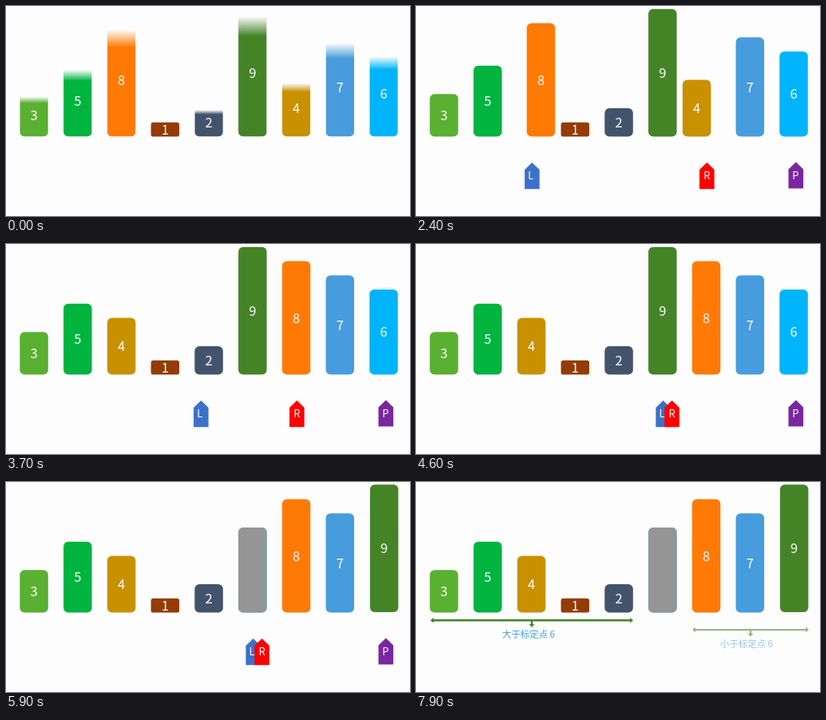
These frames come from a looping animation (506x263 px, 8000 ms). An HTML page:

```html
<!DOCTYPE html>
<html lang="zh">
<head>
<meta charset="utf-8">
<title>Partition step</title>
<style>
  html, body { margin: 0; width: 100%; height: 100%; overflow: hidden; background: #fdfdfd; }
  svg { display: block; position: absolute; left: 0; top: 0; }
  text { font-family: "Noto Sans CJK SC", "Noto Sans CJK", "Noto Sans CJK JP", "Noto Sans", sans-serif; text-anchor: middle; }
  .num { font-size: 16.5px; font-weight: 300; fill: #fff; }
  .tag { font-size: 13px; font-weight: 300; fill: #fff; }
  .note { font-size: 11.4px; font-weight: 400; fill: #479cdd; }
</style>
</head>
<body>
<svg id="stage" width="506" height="263" viewBox="0 0 506 263">
  <defs>
    <linearGradient id="fade" x1="0" y1="1" x2="0" y2="0">
      <stop id="solid" stop-color="#fff"/>
      <stop id="clear" stop-color="#000"/>
    </linearGradient>
    <mask id="wipe" maskContentUnits="objectBoundingBox">
      <rect width="1" height="1" fill="url(#fade)"/>
    </mask>
  </defs>
</svg>
<script>
const LOOP = 8000;
const STEP = 54.75, LEFT = 17.3, BAR_W = 35.5, UNIT = 17.75, FLOOR = 163.6;
const stage = document.getElementById('stage');
const solid = document.getElementById('solid');
const clear = document.getElementById('clear');

function add(parent, name, attrs, content) {
  const el = document.createElementNS('http://www.w3.org/2000/svg', name);
  for (const key in attrs) el.setAttribute(key, attrs[key]);
  if (content) el.textContent = content;
  parent.appendChild(el);
  return el;
}

const clamp = u => Math.max(0, Math.min(1, u));
const linear = u => u;
const smooth = u => (1 - Math.cos(Math.PI * u)) / 2;

// moves: [start, duration, change], summed onto a base value
function track(t, base, moves, ease = smooth) {
  return moves.reduce((sum, [start, len, change]) =>
    sum + change * ease(clamp((t - start) / len)), base);
}

const place = (el, x, y = 0) => el.setAttribute('transform', `translate(${x.toFixed(2)} ${y.toFixed(2)})`);

// value, column, colour, moves; listed back to front
const bars = [
  [6, 8, '#00b4fc', [[4687, 700, -3 * STEP]]],
  [4, 6, '#c99000', [[2296, 700, -4 * STEP]]],
  [7, 7, '#479cdd', []],
  [8, 2, '#ff7a05', [[2296, 700, 4 * STEP]]],
  [3, 0, '#5ab031', []],
  [5, 1, '#00b440', []],
  [1, 3, '#943b06', []],
  [2, 4, '#42546c', []],
  [9, 5, '#448427', [[4687, 700, 3 * STEP + 0.6]]]
].map(([value, col, color, moves]) => {
  const h = value * UNIT;
  const el = add(stage, 'g');
  const box = add(el, 'rect', {
    y: FLOOR - h, width: BAR_W, height: h,
    rx: Math.min(BAR_W, h) / 6, fill: color
  });
  add(el, 'text', { class: 'num', x: BAR_W / 2, y: FLOOR - h / 2 + 6.1 }, String(value));
  return { el, box, value, x: LEFT + col * STEP, moves };
});
const pivotGray = add(bars[0].el, 'rect');
for (const a of ['y', 'width', 'height', 'rx']) pivotGray.setAttribute(a, bars[0].box.getAttribute(a));
pivotGray.setAttribute('fill', '#959595');
bars[0].el.insertBefore(pivotGray, bars[0].el.lastChild);

// letter, centre, colour, letter shift, appear time, moves
const HOP = 255;
const tags = [
  ['P', 475.8, '#7a26a0', -0.4, 250, []],
  ['L', 35.2, '#3b72c8', -1.6, 500, [
    [1241, HOP, STEP], [1631, HOP, STEP + 0.7], [3130, HOP, STEP],
    [3520, HOP, STEP], [3910, HOP, STEP]]],
  ['R', 418.4, '#ff0000', 0, 720, [[2020, HOP, -STEP + 0.7], [4300, HOP, -43.8]]]
].map(([letter, x, color, shift, start, moves]) => {
  const el = add(stage, 'g');
  add(el, 'path', { d: 'M0 195.4L9.3 204.4V228.6H-9.3V204.4Z', fill: color });
  add(el, 'text', { class: 'tag', x: shift, y: 216.7 }, letter);
  return { el, x, start, moves };
});

// left, right, text, text centre, start
const notes = [
  [18, 272, '大于标定点 6', 141, 6350],
  [346, 492, '小于标定点 6', 414, 7350]
].map(([a, b, label, center, start]) => {
  const el = add(stage, 'g');
  const mid = (a + b) / 2;
  add(el, 'path', {
    d: `M${a + 2} 173.3H${b - 2}M${mid} 173.3V179`,
    stroke: '#448427', 'stroke-width': 2.4, fill: 'none'
  });
  add(el, 'path', {
    d: `M${a} 173.3l4 -3.3v6.6zM${b} 173.3l-4 -3.3v6.6zM${mid} 182l-3.4 -4h6.8z`,
    fill: '#448427'
  });
  add(el, 'text', { class: 'note', x: center, y: 195.4 }, label);
  return { el, start };
});

function render(t) {
  const edge = 0.785 + t * 0.0023;
  solid.setAttribute('offset', clamp(edge));
  clear.setAttribute('offset', clamp(edge + 0.155));
  for (const bar of bars) {
    if (bar.value > 1 && edge < 1) bar.box.setAttribute('mask', 'url(#wipe)');
    else bar.box.removeAttribute('mask');
    const lift = bar.value === 9 ? track(t, 0, [[4687, 700, -0.6]]) : 0;
    place(bar.el, track(t, bar.x, bar.moves), lift);
  }
  pivotGray.setAttribute('opacity', track(t, 0, [[5500, 300, 1]], linear));

  for (const tag of tags) {
    const drop = tag.moves.length ? track(t, 0, [[1631, 600, 0.6]]) : 0;
    place(tag.el, track(t, tag.x, tag.moves), drop);
    tag.el.setAttribute('opacity', track(t, 0, [[tag.start, 300, 1], [5950, 430, -1]], linear));
  }

  for (const note of notes) {
    const u = clamp((t - note.start) / 1000);
    place(note.el, 0, 26.3 * (1 - u));
    note.el.setAttribute('opacity', u);
  }
}

const begin = performance.now();
function frame() {
  render((performance.now() - begin) % LOOP);
  requestAnimationFrame(frame);
}
render(0);
requestAnimationFrame(frame);
</script>
</body>
</html>
```
